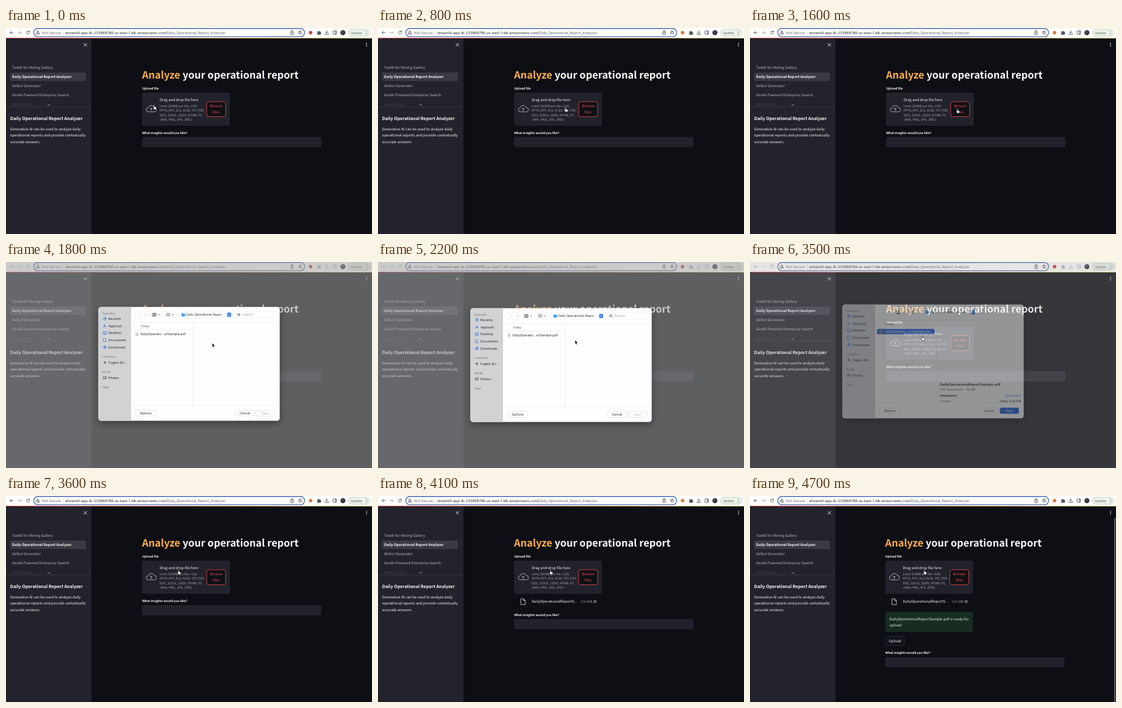
An HTML page for the animation above (5000 ms loop, 600 by 338 pixels).

```html
<!DOCTYPE html>
<html lang="en">
<head>
<meta charset="utf-8">
<title>Report upload</title>
<style>
html, body { margin: 0; width: 100%; height: 100%; overflow: hidden; background: #0d0f14; }
svg { display: block; width: 100vw; height: 100vh; text-rendering: geometricPrecision; }
.page { font: 5.97px "Noto Sans CJK JP", "Noto Sans CJK SC", "Noto Sans CJK", "Noto Sans", sans-serif; fill: #fafafa; }
.ui { font: 5.3px Inter, "Liberation Sans", sans-serif; fill: #262626; }
.bar { font-size: 5.85px; }
.small { font-size: 5.2px; }
.b { font-weight: 700; }
.muted { fill: #a3a6b0; }
.head { font-size: 4.6px; font-weight: 600; fill: #858588; }
.panel { fill: #21222b; }
.line { fill: none; stroke-width: .9; stroke-linecap: round; stroke-linejoin: round; }
.btn { fill: #fff; stroke: #d4d4d6; stroke-width: .6; }
.tool { fill: #fff; stroke: #e8e8ea; stroke-width: .6; }
.rule { fill: none; stroke: #e2e2e4; stroke-width: .6; }
.mid { text-anchor: middle; }
.end { text-anchor: end; }
.sheet { fill: #fefefe; filter: drop-shadow(0 4px 6px rgba(0, 0, 0, .4)); }
</style>
</head>
<body>
<svg viewBox="0 0 600 338">
  <defs>
    <linearGradient id="fade" x2="0" y2="1">
      <stop stop-color="#22232c" stop-opacity="0"/>
      <stop offset="1" stop-color="#22232c"/>
    </linearGradient>
    <linearGradient id="strip">
      <stop stop-color="#ff4b4b"/>
      <stop offset="1" stop-color="#fffd80"/>
    </linearGradient>
  </defs>
  <rect width="600" height="338" fill="#0d0f14"/>

  <!-- Sidebar -->
  <g class="page">
    <rect y="16" width="140" height="322" fill="#22232c"/>
    <path class="line" stroke="#eee" d="M127.8 25.3l4.6 4.6m0-4.6l-4.6 4.6"/>
    <rect x="6.5" y="73" width="124.5" height="14" rx="2" fill="#393a44"/>
    <g fill="#b9bac0">
      <text x="10" y="67.3">TextAI for Mining Gallery</text>
      <text x="10" y="97.4">Defect Generator</text>
      <text x="10" y="112.4">GenAI-Powered Enterprise Search</text>
      <text x="10" y="127.6" opacity=".7">Meet Rosalie</text>
    </g>
    <text class="b" x="10" y="82.3" font-size="5.85">Daily Operational Report Analyzer</text>
    <rect y="117" width="140" height="12.5" fill="url(#fade)"/>
    <path class="line" stroke="#aaa" d="M68.2 125.3l1.8 1.6 1.8-1.6"/>
    <path stroke="#42434c" stroke-width=".6" d="M0 129.6h140"/>
    <text class="b" x="6.8" y="151" font-size="7.15">Daily Operational Report Analyzer</text>
    <text x="6.8" y="167.7">Generative AI can be used to analyze daily</text>
    <text x="6.8" y="178.2">operational reports and provide contextually</text>
    <text x="6.8" y="188.6">accurate answers.</text>
  </g>

  <!-- Main column -->
  <g fill="#eee"><circle cx="591" cy="25" r=".8"/><circle cx="591" cy="27.3" r=".8"/><circle cx="591" cy="29.6" r=".8"/></g>
  <g id="main" class="page">
    <text class="b" x="223" y="82.6" font-size="16.45"><tspan fill="#fdae4c">Analyze</tspan> your operational report</text>
    <text class="b" x="223.2" y="101" font-size="5.1">Upload file</text>
    <rect class="panel" x="223" y="106" width="144" height="54.5" rx="3"/>
    <path class="line" stroke="#b0b3bb" stroke-width="1.2" d="M233.5 137.6a3.4 3.4 0 0 1-.3-6.8 5 5 0 0 1 9.5-.6 3.7 3.7 0 0 1 .2 7.4zM238 135.8v-4.4m-1.9 1.8l1.9-1.9 1.9 1.9"/>
    <text x="252" y="119.8">Drag and drop file here</text>
    <g class="small muted">
      <text x="252" y="130.1">Limit 200MB per file • CSV,</text>
      <text x="252" y="137.4">PPTX, RTF, XLS, XLSX, TXT, PDF,</text>
      <text x="252" y="144.7">DOC, DOCX, JSON, IPYNB, PY,</text>
      <text x="252" y="152">JAVA, PNG, JPG, JPEG</text>
    </g>
    <rect x="329" y="121" width="31" height="24.5" rx="3" fill="#0f1116" stroke="#f0484a" stroke-width=".8"/>
    <g class="mid" fill="#f0484a">
      <text x="344.5" y="130">Browse</text>
      <text x="344.5" y="140.3">files</text>
    </g>
    <g id="file">
      <path class="line" stroke="#c9cad0" d="M234.5 168.7h4.3l2.6 2.6v6.9h-6.9zM238.6 168.9v2.6h2.6"/>
      <text x="252" y="175.2">DailyOperationalReportS...</text>
      <text class="small muted" x="332" y="175">119.0KB</text>
      <path class="line" stroke="#eee" d="M353.8 171.2l4 4m0-4l-4 4"/>
    </g>
    <g id="ready">
      <rect x="223.3" y="190" width="143.5" height="33" rx="3" fill="#172d22"/>
      <g fill="#dcf5e4">
        <text x="230" y="204.3">DailyOperationalReportSample.pdf is ready for</text>
        <text x="230" y="214.3">upload</text>
      </g>
      <rect x="223.5" y="230.2" width="31" height="15.2" rx="3" fill="#11131a" stroke="#3c3d46" stroke-width=".6"/>
      <text class="mid" x="239" y="240.2">Upload</text>
    </g>
    <g id="ask">
      <text class="b" x="223.2" y="174.1" font-size="5.1">What insights would you like?</text>
      <rect class="panel" x="223" y="179" width="294" height="16.7" rx="3"/>
    </g>
  </g>
  <rect id="scroll" x="597" y="36" width="2" height="302" rx="1" fill="#63646a"/>
  <rect y="16" width="600" height="1" fill="url(#strip)"/>

  <!-- Browser bar -->
  <g class="ui bar">
    <rect width="600" height="16" fill="#fff"/>
    <rect x="45.5" y=".8" width="444" height="13.6" rx="6.8" fill="#fff" stroke="#4c6fb9" stroke-width="1.4"/>
    <g id="tools">
      <g class="line" stroke="#55585c">
        <path d="M11.8 7.5H6.6m2.3-2.4L6.5 7.5l2.4 2.4"/>
        <path stroke="#a5a7aa" d="M19.5 7.5h5.2m-2.3-2.4l2.4 2.4-2.4 2.4"/>
        <path d="M38.1 6a2.5 2.5 0 1 0 .4 2.3M38.5 4.6v1.8h-1.8"/>
        <path d="M525.8 4.2v4.2m-1.9-1.8l1.9 1.9 1.9-1.9M523 9v1.6h5.6V9"/>
        <path d="M536.5 4.8h5.2v5.4h-5.2zM540.3 5v5"/>
      </g>
      <path fill="#54575b" d="M510 5.8h1.8a1.2 1.2 0 0 1 2.3 0h1.8v1.7a1.2 1.2 0 0 1 0 2.3v1.2H510V9.4a1.1 1.1 0 0 0 0-2.1z"/>
    </g>
    <g class="line" stroke="#55585c" stroke-width=".7">
      <path d="M52.3 4.7l2.9 5.2h-5.8zM52.3 6.7v1.4m0 .9v.1"/>
      <path d="M467.8 6.2h-.8v4.4h4.2V6.2h-.8M469.1 8.4V3.9m-1.3 1.2l1.3-1.3 1.3 1.3"/>
      <path d="M482.2 4.4l.9 2 2.1.2-1.6 1.4.5 2.1-1.9-1.1-1.9 1.1.5-2.1-1.6-1.4 2.1-.2z"/>
    </g>
    <circle id="badge" cx="499.3" cy="7.6" r="2.9"/>
    <circle cx="552.3" cy="7.6" r="4.2" fill="#30343b"/>
    <circle cx="551.3" cy="6.6" r="1.5" fill="#5d636c"/>
    <text x="59" y="9.7" fill="#5f6368">Not Secure</text>
    <path stroke="#c4c6c9" stroke-width=".6" d="M93.6 4.3v6.6"/>
    <text x="97" y="9.7">streamlit-app-lb-233668788.us-east-1.elb.amazonaws.com/<tspan fill="#5f6368">Daily_Operational_Report_Analyzer</tspan></text>
    <rect x="561" y="2" width="36" height="11.2" rx="5.6" fill="#edf3ea" stroke="#b5c3b0" stroke-width=".7"/>
    <text x="565.3" y="9.5" font-size="5.3" fill="#4d6250">Update</text>
    <g fill="#4d6250"><circle cx="591" cy="5.2" r=".65"/><circle cx="591" cy="7.6" r=".65"/><circle cx="591" cy="10" r=".65"/></g>
  </g>

  <rect id="shade" width="600" height="338" fill="#a0a0a0"/>

  <!-- File dialog -->
  <g id="dialog" class="ui">
    <rect class="sheet" x="151.5" y="75.8" width="297.2" height="186.7" rx="4.5"/>
    <path fill="#d2d2d4" d="M205 75.8h-49a4.5 4.5 0 0 0-4.5 4.5V258a4.5 4.5 0 0 0 4.5 4.5h49z"/>
    <path class="rule" d="M205 101.3h243.7M205 113.2h102M307 101.3v135.9M205 237.2h243.7"/>
    <g id="places"></g>
    <g class="line" stroke="#3f7fe0" stroke-width=".7">
      <circle cx="162" cy="95" r="2.3"/><path d="M162 93.6V95l1 .7"/>
      <path d="M160 109l2-4.4 2 4.4m-3.4-1.3h2.8"/>
      <path d="M159.5 116.4h5v3.3h-5zM161 121h2"/>
      <path d="M160.2 127.5h2.4l1.3 1.3v3.6h-3.7z"/>
      <circle cx="162" cy="141.7" r="2.3"/><path d="M162 140.3v2.6m-1-.9l1 1 1-1"/>
    </g>
    <circle cx="162" cy="166.8" r="2" fill="#77777a"/>
    <path class="line" stroke="#6c6c70" stroke-width=".7" d="M159.6 189.9h4.8v3.6h-4.8zM160.4 193l1.2-1.4 1 .8.7-.6.8 1"/>

    <rect class="tool" x="212.5" y="83.3" width="21" height="10.4" rx="2"/>
    <rect class="tool" x="237" y="83.3" width="18.5" height="10.4" rx="2"/>
    <rect class="tool" x="260" y="83.3" width="18" height="10.4" rx="2"/>
    <rect class="tool" x="283.5" y="83.3" width="88" height="10.4" rx="2"/>
    <rect class="tool" x="376.5" y="83.3" width="63.5" height="10.4" rx="2"/>
    <g class="line" stroke="#55565a" stroke-width=".7">
      <path stroke="#b9b9bc" d="M218.8 86.8l-1.6 1.7 1.6 1.7M227.6 86.8l1.6 1.7-1.6 1.7"/>
      <path d="M240.5 86.2h5.4v4.6h-5.4zM242.3 86.2v4.6m1.8-4.6v4.6M250 87.9l1.2 1.2 1.2-1.2M272 87.9l1.2 1.2 1.2-1.2"/>
      <path d="M263 86.8h1m1.3 0h1m1.3 0h1M263 89.8h1m1.3 0h1m1.3 0h1" stroke-width="1.3"/>
      <circle cx="381.4" cy="88" r="1.6"/><path d="M382.6 89.3l1.4 1.4"/>
    </g>
    <path fill="#4b9bea" d="M287.8 86h2.2l.6.7h2.9v4.5h-5.7z"/>
    <text x="295" y="90.4" font-size="5.15">Daily-Operational-Repor...</text>
    <rect x="362.6" y="85" width="6.4" height="7" rx="1.5" fill="#2b72e6"/>
    <path class="line" stroke="#fff" stroke-width=".7" d="M364.6 87.8l1.2-1.2 1.2 1.2m-2.4 1.5l1.2 1.2 1.2-1.2"/>
    <text x="387.5" y="90.4" fill="#9b9b9e">Search</text>

    <text x="220.7" y="109.4" font-size="4.9" font-weight="500" fill="#6a6a6d">Today</text>
    <rect id="row" x="208.5" y="115.8" width="94" height="8.8" rx="1.6" fill="#1f5fd6"/>
    <path id="doc" class="line" stroke-width=".7" d="M213.1 117.9h2.5l1.4 1.4v3.3h-3.9z"/>
    <circle cx="215" cy="120.5" r=".9" fill="#77797e"/>
    <text id="name" x="220.5" y="122">DailyOperatio...ortSample.pdf</text>
    <g id="preview">
      <text x="311" y="209.3" font-size="5.95" font-weight="600">DailyOperationalReportSample.pdf</text>
      <text x="311" y="217.4" fill="#5c5c60">PDF document - 119 KB</text>
      <text x="311" y="227" font-size="5" font-weight="700">Information</text>
      <text class="end" x="444.3" y="227" font-size="4.8" fill="#1f5fd6">Show More</text>
      <path class="rule" d="M311 229.8h133.5"/>
      <text x="311" y="236.3" font-size="4.8" fill="#5c5c60">Created</text>
      <text class="end" x="444.3" y="236.3" font-size="4.8" font-weight="500">Today, 9:30 PM</text>
    </g>
    <rect class="btn" x="212.7" y="245.3" width="32.3" height="9.4" rx="2"/>
    <rect class="btn" x="376" y="245.3" width="31.4" height="9.4" rx="2"/>
    <rect id="open" class="btn" x="410" y="245.3" width="30.4" height="9.4" rx="2"/>
    <g class="mid">
      <text x="228.9" y="251.9">Options</text>
      <text x="391.7" y="251.9">Cancel</text>
      <text id="openText" x="425.2" y="251.9">Open</text>
    </g>
  </g>

  <!-- Pointer, tip at the origin -->
  <g id="cursor" stroke-linejoin="round">
    <path id="arrow" fill="#000" stroke="#fff" stroke-width=".6" d="M0 0v6.6l1.5-1.4 1 2.3 1.2-.5-1-2.2h2.1z"/>
    <path id="hand" fill="#fff" stroke="#111" stroke-width=".6" d="M1 .7a.7.7 0 0 1 1.4 0v2.5l2.3.5q.9.3.8 1.2L5 7.8H2.1L.2 5.3q-.3-.8.8-.5z"/>
  </g>
</svg>
<script>
const $ = id => document.getElementById(id);
const set = (id, attrs) => { for (const k in attrs) $(id).setAttribute(k, attrs[k]); };
const show = (id, on) => { $(id).style.display = on ? "" : "none"; };
const move = (id, x, y) => set(id, { transform: `translate(${x} ${y})` });

// Linear value between rows of [time, value]
function track(keys, t) {
  const i = keys.findIndex(k => k[0] > t);
  if (i < 0) return keys[keys.length - 1][1];
  const [t0, v0] = keys[i - 1], [t1, v1] = keys[i];
  return v0 + (v1 - v0) * (t - t0) / (t1 - t0);
}

const places = [
  ["Favorites", 86, 1], ["Recents", 95], ["Applicati...", 106.7], ["Desktop", 118.4],
  ["Documents", 130], ["Downloads", 141.7], ["Locations", 157, 1], ["Fogbin Dri...", 166.8],
  ["Media", 182, 1], ["Photos", 191.7], ["Tags", 207.4, 1]
];
$("places").innerHTML = places.map(([label, y, head]) =>
  `<text x="${head ? 158 : 168}" y="${y + 1.9}" class="${head ? "head" : ""}">${label}</text>`).join("");

const cursorX = [[0, 241], [200, 241], [1100, 338], [1900, 338], [2400, 313], [2700, 281], [4200, 281], [4600, 284]];
const cursorY = [[0, 126], [200, 126], [1100, 132], [1600, 132], [1800, 133], [1900, 133], [2400, 125], [2700, 121]];
const opening = [[0, 0], [1600, 0], [1700, .4], [1800, .75], [1900, 1], [3400, 1], [3500, .25], [3600, 0]];

function draw(t) {
  const p = track(opening, t);
  move("dialog", 0, -8 * (1 - p));
  set("dialog", { opacity: Math.min(1, p * 1.9) });
  set("shade", { opacity: .55 * Math.min(1, p * 2) });
  set("tools", { opacity: p > 0 ? .4 : 1 });

  const picked = t >= 3100;
  show("row", picked);
  show("preview", t >= 3200);
  set("name", { fill: picked ? "#fff" : "#262626" });
  set("doc", { stroke: picked ? "#f2d36b" : "#c4c5c9" });
  set("open", { style: picked ? "fill:#1f5fd6;stroke:#1f5fd6" : "" });
  set("openText", { fill: picked ? "#fff" : "#b5b5b8" });

  const uploaded = t >= 3800, ready = t >= 4400;
  show("file", uploaded);
  show("ready", ready);
  show("scroll", ready);
  move("main", ready ? -1.4 : 0, 0);
  move("ask", 0, ready ? 85.4 : uploaded ? 22.7 : 0);

  set("badge", { fill: t < 600 || p > 0 ? "#d2402f" : "#e0762f" });
  const arrow = t >= 1700 && t < 3500;
  show("arrow", arrow);
  show("hand", !arrow);
  move("cursor", track(cursorX, t), track(cursorY, t));
}

function tick() {
  draw(Math.floor(performance.now() % 5000 / 100) * 100);
  requestAnimationFrame(tick);
}
tick();
</script>
</body>
</html>
```
